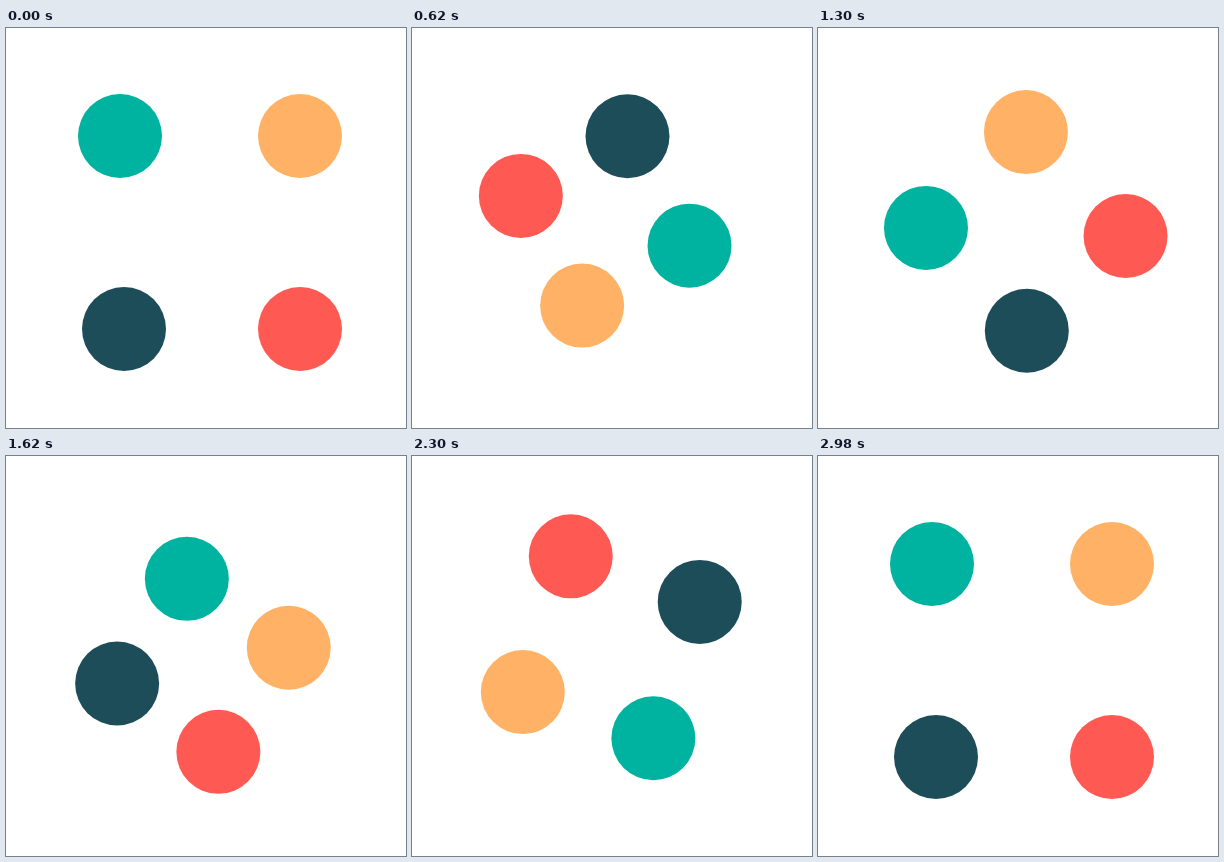
An HTML page with a canvas that plays this animation: 400x400 px, repeating every 3 s.

```html
<!DOCTYPE html>
<html lang="en">
<head>
<meta charset="utf-8">
<title>Spinning dots</title>
<style>
  html, body { margin: 0; width: 100%; height: 100%; overflow: hidden; background: #fff; }
  canvas { display: block; width: 400px; height: 400px; }
</style>
</head>
<body>
<canvas id="stage" width="400" height="400"></canvas>
<script>
  const ctx = document.getElementById('stage').getContext('2d');
  const LOOP = 3000, STEP = 20, SPIN_END = 2960, RADIUS = 42;

  // Places relative to the pivot: spread out and drawn together
  const dots = [
    { color: '#00b2a0', far: [-86, -92], near: [-52, -43] },
    { color: '#ffb265', far: [94, -92], near: [56, -43] },
    { color: '#1e4d5a', far: [-82, 101], near: [-52, 65] },
    { color: '#ff5953', far: [94, 101], near: [56, 65] }
  ];

  const lerp = (a, b, k) => a + (b - a) * k;

  // 0 = spread out, 1 = drawn together; the last pulse returns a little sooner
  function pull(t) {
    const peak = 520;
    const local = t % 1000;
    const end = t >= 2000 ? SPIN_END - 2000 : 1000;
    if (local < peak) return local / peak;
    return Math.max(0, (end - local) / (end - peak));
  }

  function draw(t) {
    const k = pull(t);
    const angle = Math.min(t / SPIN_END, 1) * Math.PI * 4;
    const c = Math.cos(angle), s = Math.sin(angle);
    ctx.fillStyle = '#fff';
    ctx.fillRect(0, 0, 400, 400);
    for (const { color, far, near } of dots) {
      const x = lerp(far[0], near[0], k);
      const y = lerp(far[1], near[1], k);
      ctx.fillStyle = color;
      ctx.beginPath();
      ctx.arc(200 + c * x - s * y, 200 + s * x + c * y, RADIUS, 0, Math.PI * 2);
      ctx.fill();
    }
  }

  function tick() {
    const t = Math.floor((performance.now() + 0.5) / STEP) * STEP;
    draw(t % LOOP);
    requestAnimationFrame(tick);
  }

  tick();
</script>
</body>
</html>
```
